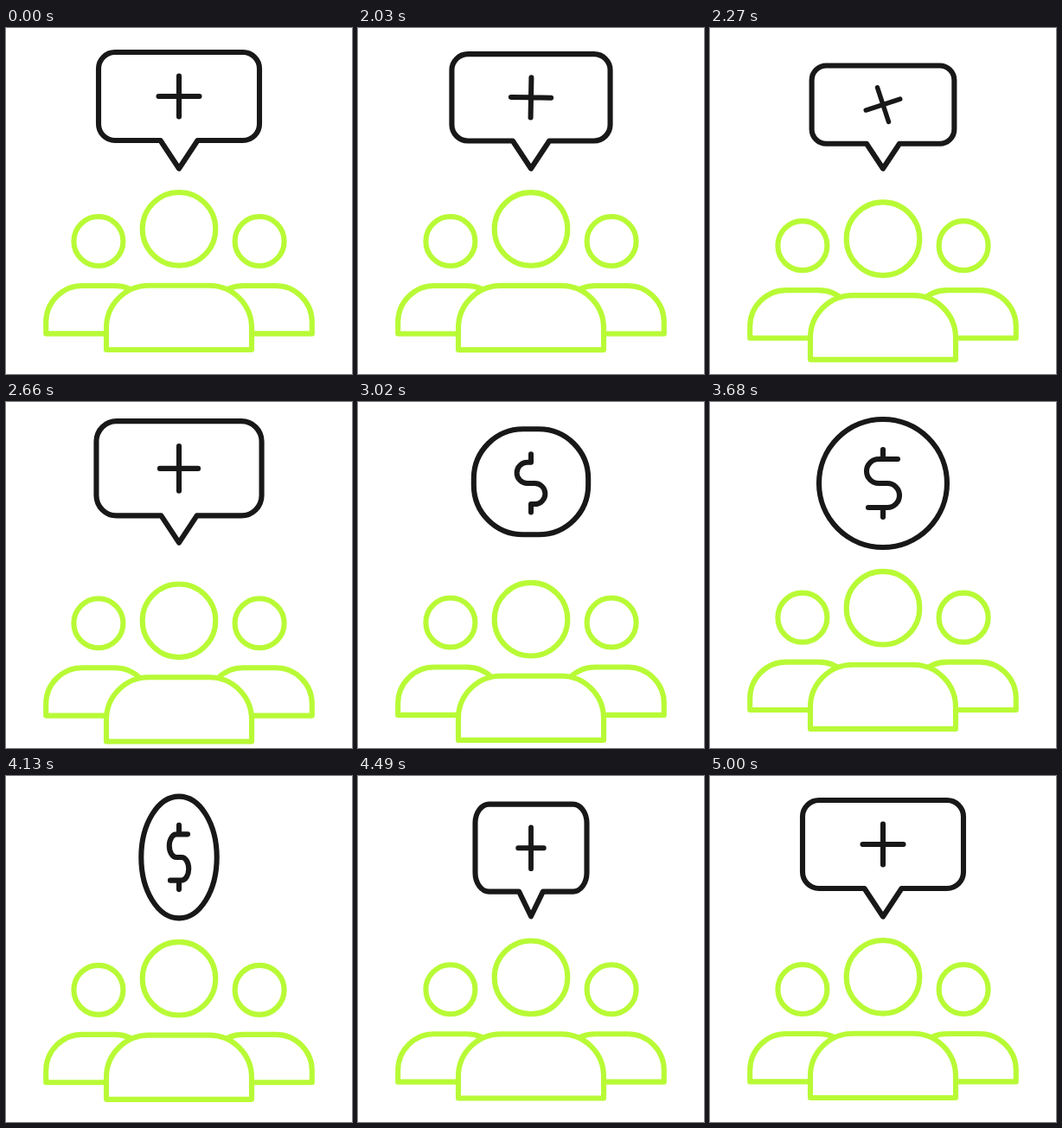
Animation of 400x400 px, one loop 5.03 s. Source, as an HTML page with a canvas:

```html
<!DOCTYPE html>
<html lang="en">
<head>
<meta charset="utf-8">
<title>Team funding</title>
<style>
  html, body { margin: 0; width: 100%; height: 100%; overflow: hidden; background: #fff; }
  canvas { display: block; width: 100vw; height: 100vh; }
</style>
</head>
<body>
<canvas id="stage"></canvas>
<script>
const LOOP = 5030, STEP = 30;
const LIME = '#b8fa36', INK = '#181818', PEN = 6.1;
const canvas = document.getElementById('stage');
const ctx = canvas.getContext('2d');

const lerp = (a, b, p) => a + (b - a) * p;
const clamp = p => Math.max(0, Math.min(1, p));
const smooth = p => (1 - Math.cos(Math.PI * p)) / 2;

// Ease curve with control points (x1, 0) and (x2, 1)
const bezier = (x1, x2) => p => {
  let lo = 0, hi = 1, t = 0.5;
  for (let i = 0; i < 24; i++) {
    t = (lo + hi) / 2;
    const u = 1 - t;
    if (3 * u * u * t * x1 + 3 * u * t * t * x2 + t * t * t < p) lo = t; else hi = t;
  }
  return t * t * (3 - 2 * t);
};
const sink = bezier(0.45, 0.35), rise = bezier(0.45, 0.16);

// Keys are [time, value, ease towards this key]
function track(keys, t) {
  if (t <= keys[0][0]) return keys[0][1];
  for (let i = 1; i < keys.length; i++) {
    const [t0, v0] = keys[i - 1], [t1, v1, ease = smooth] = keys[i];
    if (t <= t1) return lerp(v0, v1, ease((t - t0) / (t1 - t0)));
  }
  return keys[keys.length - 1][1];
}

const DROP = [[2000, 0], [2600, 20.5, sink], [5000, 0, rise]];
const SIZE = [[2000, 1], [2150, 0.838], [2555, 1.075], [2960, 0.86], [3640, 1],
              [3720, 1], [4290, 0.94], [4800, 1]];
const MORPH = [[2560, 0], [3170, 1], [4150, 1], [4560, 0]];
const SPIN = [[2000, 0], [2620, Math.PI]];
const FLIP = [[3720, 0], [4860, Math.PI]];

function ring(x, y, r) {
  ctx.beginPath();
  ctx.arc(x, y, r, 0, 2 * Math.PI);
  ctx.stroke();
}

function torso(left, right, top, bottom, r) {
  ctx.beginPath();
  ctx.moveTo(left, bottom);
  ctx.arc(left + r, top + r, r, Math.PI, 1.5 * Math.PI);
  ctx.arc(right - r, top + r, r, 1.5 * Math.PI, 2 * Math.PI);
  ctx.lineTo(right, bottom);
  ctx.closePath();
  ctx.fill();
  ctx.stroke();
}

function people(drop) {
  ctx.strokeStyle = LIME;
  ctx.fillStyle = '#fff';
  ctx.lineWidth = PEN;
  ctx.lineJoin = 'round';
  const side = drop * 0.45;
  for (const x of [106.9, 293.1]) {
    ring(x, 246.5 + side, 28.5);
    torso(x - 60.7, x + 60.7, 298 + side, 353.4 + side, 42);
  }
  ring(200, 232.3 + drop, 42.3);
  torso(116, 284, 297.8 + drop, 372 + drop, 49);
}

// Rounded box with a tail, turning into a circle as m goes to 1
function bubble(m) {
  const w = lerp(93, 74, m), h = lerp(51, 74, m), r = lerp(19, 74, m);
  const cy = lerp(79, 94, m), tail = clamp(1 - m * 1.2);
  const corner = (sx, sy, a) =>
    ctx.arc(sx * (w - r), cy + sy * (h - r), r, a, a + Math.PI / 2);
  ctx.beginPath();
  corner(-1, -1, Math.PI);
  corner(1, -1, 1.5 * Math.PI);
  corner(1, 1, 0);
  if (tail > 0) {
    ctx.lineTo(21.5 * tail, cy + h);
    ctx.lineTo(0, cy + h + 32.5 * tail);
    ctx.lineTo(-21.5 * tail, cy + h);
  }
  corner(-1, 1, Math.PI / 2);
  ctx.closePath();
}

// One half of the sign; the other is the same turned by 180 degrees
function halfSign(m) {
  const split = clamp(m / 0.8), bar = 23.5 * (1 - m * 1.5);
  ctx.moveTo(0, -28 * split);
  ctx.lineTo(0, -lerp(23.5, 39, split));
  if (bar > 0) {
    ctx.moveTo(0, 0);
    ctx.lineTo(bar, 0);
  }
  if (m <= 0) return;
  const bend = 14 * Math.PI, len = m * m * (27 + bend);
  ctx.moveTo(0, 0);
  ctx.lineTo(-Math.min(len, 5), 0);
  if (len > 5) {
    const turn = Math.min(len - 5, bend) / 14;
    ctx.arc(-5, -14, 14, Math.PI / 2, Math.PI / 2 + turn);
  }
  if (len > 5 + bend) ctx.lineTo(len - 10 - bend, -28);
}

function badge(t) {
  const m = track(MORPH, t), size = track(SIZE, t);
  const flip = Math.max(0.02, Math.abs(Math.cos(track(FLIP, t))));
  const anchor = lerp(163, 94, clamp(m * 1.15));
  ctx.strokeStyle = INK;
  ctx.lineWidth = PEN;
  ctx.lineCap = ctx.lineJoin = 'round';

  // Shapes are scaled, the pen is not
  const place = () => {
    ctx.save();
    ctx.translate(200, anchor);
    ctx.scale(size * flip, size);
    ctx.translate(0, -anchor);
  };
  place();
  bubble(m);
  ctx.restore();
  ctx.stroke();

  ctx.beginPath();
  place();
  ctx.translate(0, lerp(79, 94, clamp(m * 1.15)));
  ctx.rotate(track(SPIN, t));
  halfSign(m);
  ctx.rotate(Math.PI);
  halfSign(m);
  ctx.restore();
  ctx.lineWidth = PEN * Math.min(1, lerp(size, 1, m));
  ctx.stroke();
}

function draw(time) {
  const t = Math.floor((time % LOOP - 20) / STEP) * STEP + 20;
  const dpr = window.devicePixelRatio || 1;
  const w = Math.round(innerWidth * dpr), h = Math.round(innerHeight * dpr);
  if (canvas.width !== w || canvas.height !== h) {
    canvas.width = w;
    canvas.height = h;
  }
  ctx.setTransform(1, 0, 0, 1, 0, 0);
  ctx.fillStyle = '#fff';
  ctx.fillRect(0, 0, w, h);
  ctx.setTransform(w / 400, 0, 0, h / 400, 0, 0);
  people(track(DROP, t));
  badge(t);
}

const start = performance.now();
function tick() {
  draw(Math.max(0, performance.now() - start));
  requestAnimationFrame(tick);
}
tick();
</script>
</body>
</html>
```
